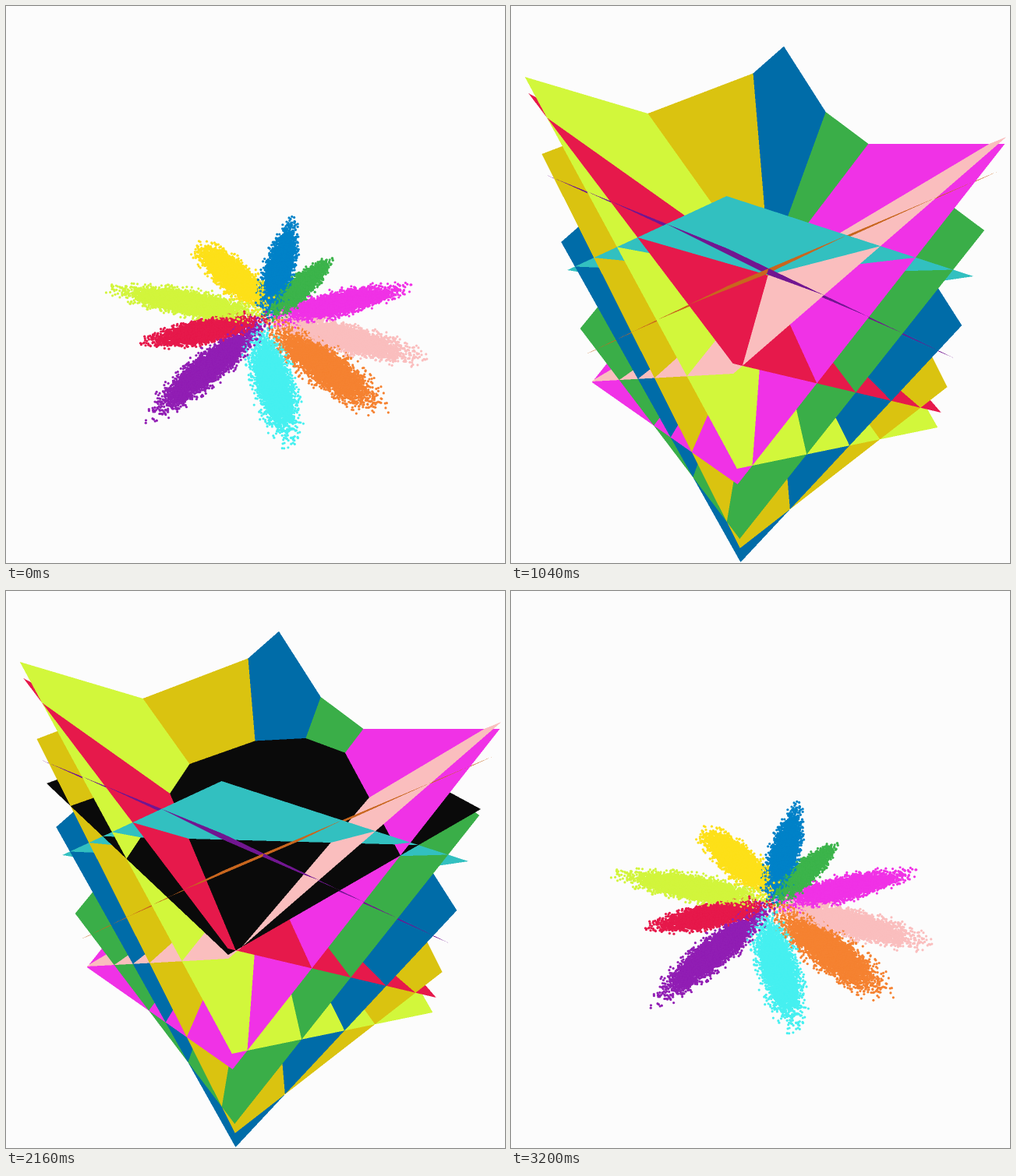
These frames come from a looping animation (640x715 px, 3600 ms). An HTML page with a canvas:

```html
<!DOCTYPE html>
<html>
<head>
<meta charset="utf-8">
<style>
html, body { margin: 0; width: 100%; height: 100%; overflow: hidden; background: #fcfcfc; }
canvas { display: block; }
</style>
</head>
<body>
<canvas id="stage" width="640" height="715"></canvas>
<script>
const W = 640, H = 715, LOOP = 3600, BG = '#fcfcfc';

function layer(scale) {
  const c = document.createElement('canvas');
  c.width = W * scale;
  c.height = H * scale;
  return c;
}

// Point clouds: colour, inner end x/y, outer end x/y, spread at the inner and outer end
const clouds = [
  ['#fabebe', 332, 400, 545, 455, 6.5, 7],
  ['#f032e6', 330, 405, 526, 359, 7.5, 4.5],
  ['#3cb44b', 334, 402, 421, 321, 6.5, 4],
  ['#0082c8', 333, 407, 368, 268, 8.5, 5.5],
  ['#fde019', 343, 392, 236, 299, 8, 7.5],
  ['#d2f53c', 342, 400, 122, 362, 7, 5.5],
  ['#e6194b', 342, 401, 168, 434, 6, 5.5],
  ['#f58231', 325, 400, 492, 524, 9, 10],
  ['#46f0f0', 319, 400, 368, 572, 10, 9.5],
  ['#911eb4', 344, 393, 176, 535, 7.5, 8]
];

function random(seed) {
  return () => (seed = (seed * 16807) % 2147483647) / 2147483647;
}

function drawClouds() {
  const canvas = layer(1), g = canvas.getContext('2d'), rnd = random(4711);
  const reach = 3.4, inside = 1 - Math.exp(-reach * reach / 2);
  g.fillStyle = BG;
  g.fillRect(0, 0, W, H);
  // One dot of each cloud per round, so that colours mix where clouds meet
  for (let i = 0; i < 5000; i++) {
    for (const [color, x0, y0, x1, y1, inner, outer] of clouds) {
      const dx = x1 - x0, dy = y1 - y0;
      const r = Math.sqrt(-2 * Math.log(1 - rnd() * inside));
      const a = rnd() * 2 * Math.PI;
      const along = 0.5 + r * Math.cos(a) / (2 * reach);
      const spread = inner + (outer - inner) * along;
      const across = r * Math.sin(a) * spread / Math.hypot(dx, dy);
      g.fillStyle = color;
      g.beginPath();
      g.arc(x0 + dx * along - dy * across, y0 + dy * along + dx * across, 1.6, 0, 7);
      g.fill();
    }
  }
  return canvas;
}

// Planes over one square: colour, then screen height at its left, right and front corner
const planes = [
  [[210, 247, 59], 91, 541, 594],
  [[230, 25, 75], 112, 522, 459],
  [[218, 195, 16], 190, 489, 696],
  [[113, 22, 145], 217, 452, 312],
  [[0, 108, 168], 303, 410, 714],
  [[50, 192, 192], 339, 347, 244],
  [[58, 174, 72], 414, 288, 684],
  [[200, 102, 30], 447, 212, 358],
  [[250, 190, 190], 482, 168, 472],
  [[240, 50, 230], 483, 177, 614]
];
const ground = [[10, 10, 10], 247, 280, 467];

// Camera: homogeneous corners of the ground square and the vertical vanishing point
const corner = (x, y, w) => [x * w, y * w, w];
const left = corner(52, 247, 0.82208), right = corner(609, 280, 0.78687);
const front = corner(285, 467, 0.60895);
const back = left.map((v, i) => v + right[i] - front[i]);
const down = [324, 1486, 1];
const center = left.map((v, i) => (v + right[i]) / 2);

const sub = (a, b) => a.map((v, i) => v - b[i]);
const dot = (a, b) => a[0] * b[0] + a[1] * b[1] + a[2] * b[2];
const cross = (a, b) => [
  a[1] * b[2] - a[2] * b[1],
  a[2] * b[0] - a[0] * b[2],
  a[0] * b[1] - a[1] * b[0]
];

const axisP = sub(left, right), axisQ = sub(front, back);
const det = dot(axisP, cross(axisQ, down));
const inverse = [cross(axisQ, down), cross(down, axisP), cross(axisP, axisQ)]
  .map(row => row.map(v => v / det));
const eye = inverse.map(row => -dot(row, center));

// Depth below the ground for a screen height on a corner's vertical line
const depth = (c, y) => (c[2] * y - c[1]) / (down[1] - y);

function toPlane([color, yl, yr, yf]) {
  const l = depth(left, yl), r = depth(right, yr), f = depth(front, yf);
  const mid = (l + r) / 2, s = l - r, t = 2 * (f - mid);
  return { color, s, t, gap: mid + s * eye[0] + t * eye[1] - eye[2] };
}

function castPlanes(list) {
  const scale = 2, canvas = layer(scale), g = canvas.getContext('2d');
  const img = g.createImageData(canvas.width, canvas.height);
  const solids = list.map(toPlane);
  let k = 0;
  for (let j = 0; j < canvas.height; j++) {
    for (let i = 0; i < canvas.width; i++, k += 4) {
      const x = (i + 0.5) / scale, y = (j + 0.5) / scale;
      const [dp, dq, dz] = inverse.map(row => row[0] * x + row[1] * y + row[2]);
      let near = Infinity, color = [252, 252, 252];
      for (const o of solids) {
        const d = o.gap / (dz - o.s * dp - o.t * dq);
        if (d > 0 && d < near &&
            Math.abs(eye[0] + d * dp) + Math.abs(eye[1] + d * dq) <= 0.5) {
          near = d;
          color = o.color;
        }
      }
      img.data[k] = color[0];
      img.data[k + 1] = color[1];
      img.data[k + 2] = color[2];
      img.data[k + 3] = 255;
    }
  }
  g.putImageData(img, 0, 0);
  return canvas;
}

const scatter = drawClouds();
const open = castPlanes(planes);
const cut = castPlanes([...planes, ground]);
const ctx = document.getElementById('stage').getContext('2d');

function frame() {
  const t = performance.now() % LOOP;
  const view = t < 400 || t >= 3200 ? scatter : t >= 1200 && t < 2400 ? cut : open;
  ctx.drawImage(view, 0, 0, W, H);
  requestAnimationFrame(frame);
}
frame();
</script>
</body>
</html>
```
